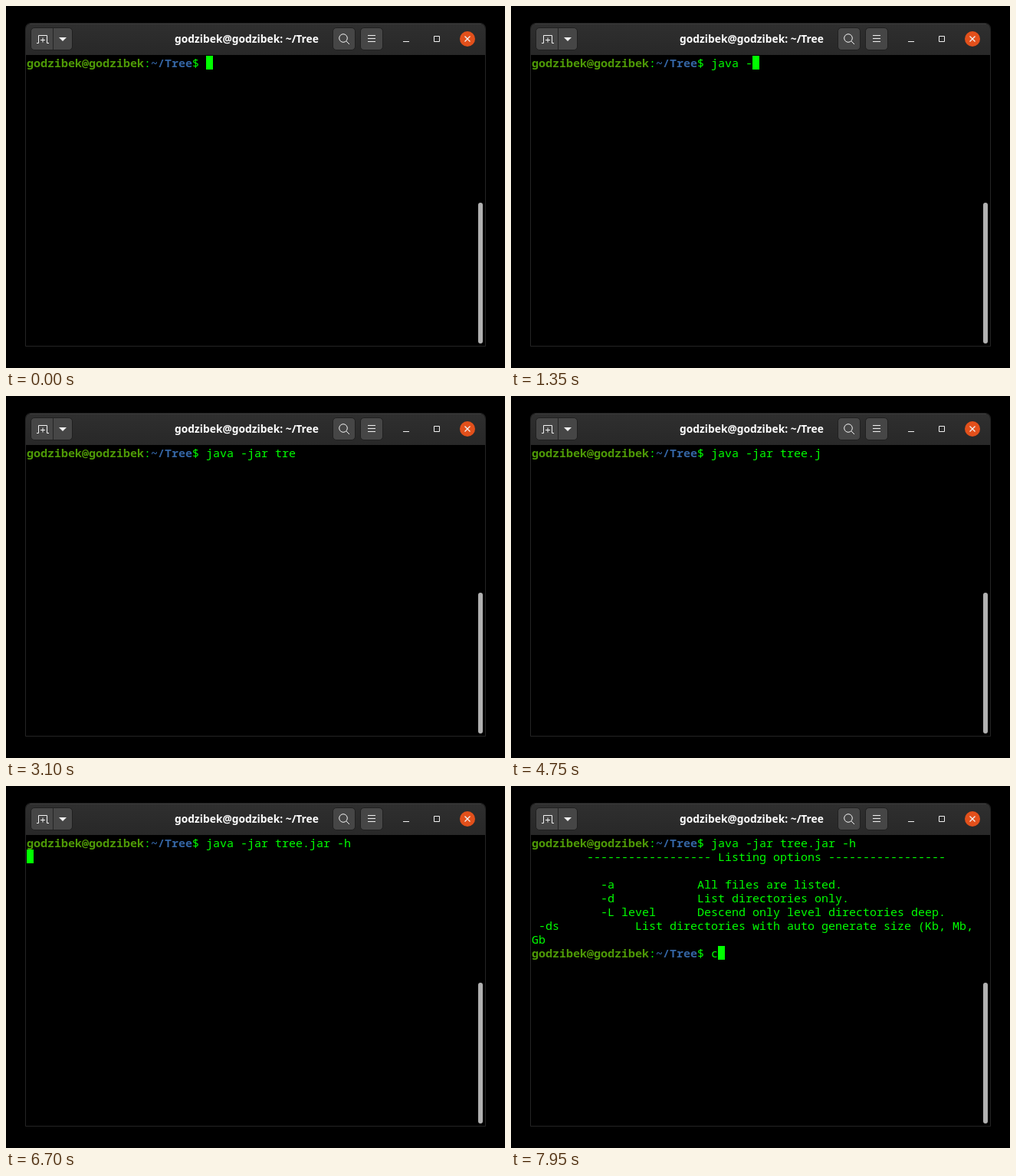
Write an HTML page that moves like this. It is 651 px wide and 473 px high and loops after 8 s.

```html
<!DOCTYPE html>
<html lang="en">
<head>
<meta charset="utf-8">
<title>Terminal</title>
<style>
  html, body { margin: 0; width: 100%; height: 100%; overflow: hidden; background: #000; }
  svg { display: block; }
  .term text { font: 15px "Noto Sans Mono", "DejaVu Sans Mono", monospace; fill: #0f0; white-space: pre; }
  .term .user { fill: #4e9a06; font-weight: bold; }
  .term .dir { fill: #3465a4; font-weight: bold; }
  .title { font: bold 13.8px "Noto Sans", "Open Sans", sans-serif; fill: #fff; text-anchor: middle; }
  .button { fill: #464646; stroke: #202020; }
  .icon { fill: none; stroke: #f2f2f2; }
</style>
</head>
<body>
<svg width="651" height="473" viewBox="0 0 651 473">
  <defs>
    <linearGradient id="bar" x2="0" y2="1">
      <stop stop-color="#2f2f2f"/>
      <stop offset="1" stop-color="#282828"/>
    </linearGradient>
  </defs>
  <path d="M25.5 444.5V30q0-7.500 7.500-7.500H618q7.500 0 7.500 7.500V444.500z" stroke="#242424"/>
  <path d="M26 64V30q0-7 7-7H618q7 0 7 7V64z" fill="url(#bar)"/>
  <path d="M31 23.500H620" stroke="#3a3a3a"/>

  <rect class="button" x="32.500" y="28.500" width="54" height="29" rx="4.500"/>
  <path d="M61.500 29V57" stroke="#242424"/>
  <rect class="button" x="426.500" y="28.500" width="29" height="29" rx="4.500"/>
  <rect class="button" x="462.500" y="28.500" width="29" height="29" rx="4.500"/>
  <g class="icon">
    <path d="M40 48.500H42.500V38.500H53.500V48.500H56M45 44.500H51M48 41.500V47.500"/>
    <circle cx="440" cy="42" r="5.300"/>
    <path d="M444 46L448 50M472 38.500H482M472 42.500H482M472 46.500H482"/>
    <path d="M518 46.500H526M558.500 39.500H565.500V46.500H558.500z"/>
  </g>
  <path d="M69 41H79L74 46z" fill="#f2f2f2"/>
  <circle cx="602" cy="43" r="10" fill="#e2501b"/>
  <path class="icon" d="M598.500 39.500L605.500 46.500M605.500 39.500L598.500 46.500" stroke-width="1.300"/>
  <text class="title" x="314" y="48">godzibek@godzibek: ~/Tree</text>

  <rect x="616" y="257" width="6" height="184" rx="3" fill="#b1b1b1"/>
  <g class="term" id="term"></g>
  <rect id="cursor" width="9" height="18" fill="#0f0"/>
</svg>
<script>
const LOOP = 8000, LEFT = 27, TOP = 65, CELL = 9, ROW = 18, PROMPT = 26, LAST = 8;
const COMMAND = "java -jar tree.jar -h";
// One moment per typed character of COMMAND
const KEYS = [410, 550, 750, 880, 1040, 1350, 1710, 1850, 2050, 2280, 2610,
  2850, 3100, 3260, 3660, 4750, 4920, 5110, 5320, 6190, 6490];
const ENTER = 6700, PRINT = 6760, READY = 6860, NEXT_KEY = 7950;
const BLINK_OFF = 2280, BLINK_ON = 5320;

const option = (flag, text) => " ".repeat(10) + flag.padEnd(14) + text;
const OUTPUT = [
  " ".repeat(8) + "-".repeat(18) + " Listing options " + "-".repeat(17),
  "",
  option("-a", "All files are listed."),
  option("-d", "List directories only."),
  option("-L level", "Descend only level directories deep."),
  " -ds".padEnd(15) + "List directories with auto generate size (Kb, Mb,",
  "Gb"
];

const term = document.getElementById("term");
const cursor = document.getElementById("cursor");

function addText(col, row, text, style = "") {
  const el = document.createElementNS("http://www.w3.org/2000/svg", "text");
  el.setAttribute("x", LEFT + col * CELL);
  el.setAttribute("y", TOP + 15 + row * ROW);
  el.setAttribute("class", style);
  el.textContent = text;
  term.append(el);
  return el;
}

function addPrompt(row) {
  return [
    addText(0, row, "godzibek@godzibek", "user"),
    addText(17, row, ":"),
    addText(18, row, "~/Tree", "dir"),
    addText(24, row, "$")
  ];
}

function show(els, on) {
  for (const el of els) el.style.display = on ? "" : "none";
}

addPrompt(0);
const command = addText(PROMPT, 0, "");
const output = OUTPUT.map((line, i) => addText(0, i + 1, line));
const prompt = addPrompt(LAST);
const next = addText(PROMPT, LAST, "c");

function draw(t) {
  const typed = KEYS.filter(k => k <= t).length;
  command.textContent = COMMAND.slice(0, typed);
  show(output, t >= PRINT);
  show(prompt, t >= READY);
  show([next], t >= NEXT_KEY);
  show([cursor], t < BLINK_OFF || t >= BLINK_ON);

  let col = PROMPT + typed, row = 0;
  if (t >= ENTER) [col, row] = [0, 1];
  if (t >= PRINT) row = LAST;
  if (t >= READY) col = PROMPT + (t >= NEXT_KEY);
  cursor.setAttribute("x", LEFT + col * CELL);
  cursor.setAttribute("y", TOP + row * ROW);
}

const start = performance.now();
function tick() {
  draw((performance.now() - start) % LOOP);
  requestAnimationFrame(tick);
}
tick();
</script>
</body>
</html>
```
